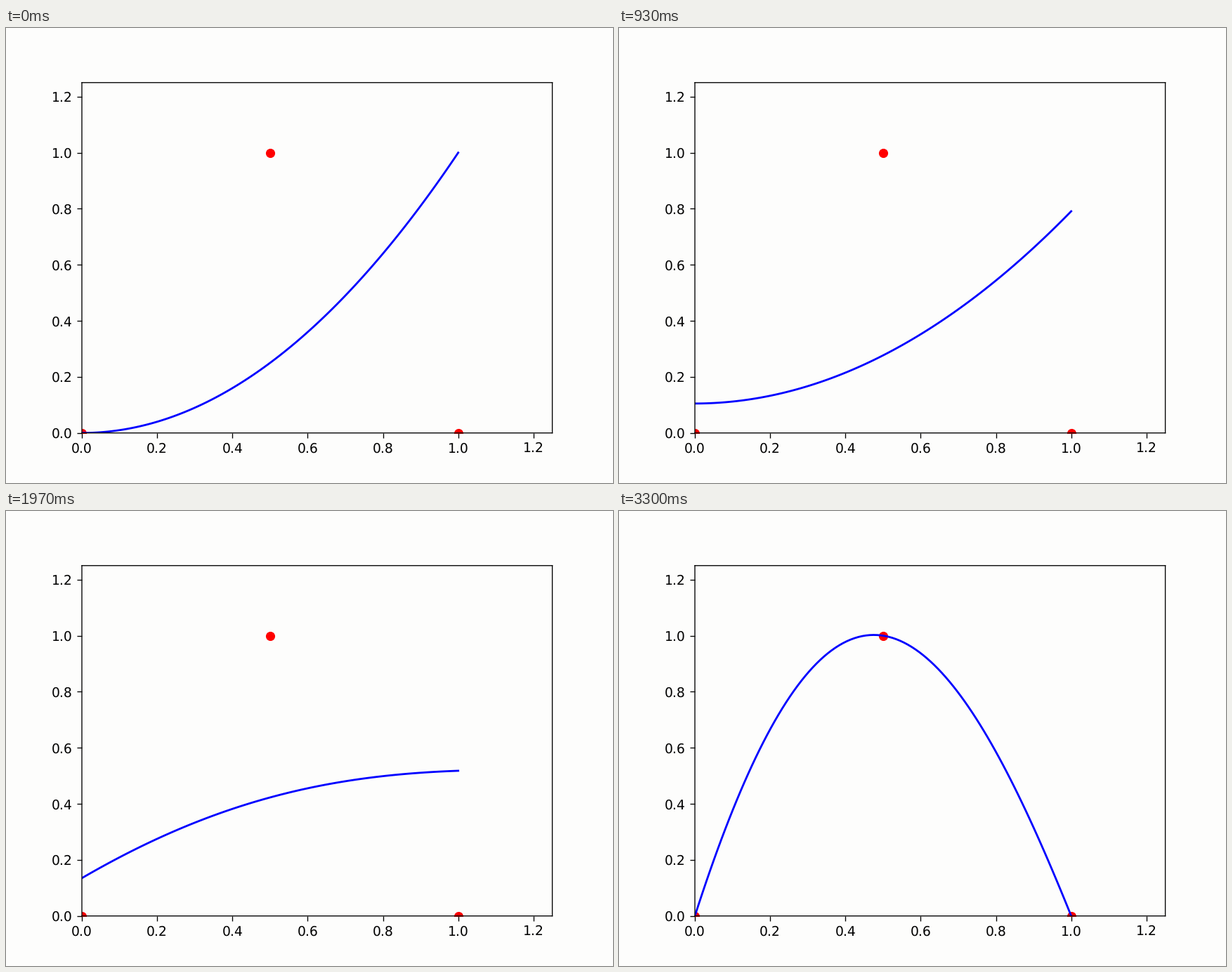
A matplotlib script for the animation above (3.33 s loop, 864 px wide and 648 px high).

```python
import numpy as np
import matplotlib.pyplot as plt
from matplotlib.animation import FuncAnimation

FRAMES, INTERVAL = 111, 30
PAPER = "#fdfdfc"

# Key points of the fit: curve height at both ends, and progress from dip to arch.
KEY_TIMES = [0, 360, 930, 1320, 1950, 2760, 3300]
LEFT = [0, 0.024, 0.105, 0.150, 0.135, 0.012, 0]
RIGHT = [1, 0.869, 0.791, 0.700, 0.518, 0.170, 0]
ARCH = [0, 0.021, 0.063, 0.092, 0.277, 0.804, 1]

plt.rcParams.update({
    "path.snap": False,
    "text.hinting": "none",
    "axes.linewidth": 0.72,
    "xtick.major.width": 0.72,
    "ytick.major.width": 0.72,
})


def height(x, time):
    """Straight line between the ends plus a bulge that leans left as it grows."""
    left, right, arch = (np.interp(time, KEY_TIMES, track)
                         for track in (LEFT, RIGHT, ARCH))
    side = 1 - 2 * x
    lean = arch**2 * (0.42 * side - 0.25 * side**2)
    return left + (right - left) * x + x * (1 - x) * (5 * arch - 1 + lean)


fig, ax = plt.subplots(figsize=(6.4, 4.8), dpi=135, facecolor=PAPER)
ax.set_facecolor(PAPER)
ax.set(xlim=(0, 1.25), ylim=(0, 1.25))
ax.plot([0, 0.5, 1], [0, 1, 0], "ro")
x = np.linspace(0, 1, 100)
curve, = ax.plot(x, height(x, 0), "b-")


def update(frame):
    curve.set_ydata(height(x, frame * INTERVAL))
    return curve,


anim = FuncAnimation(fig, update, frames=FRAMES, interval=INTERVAL,
                     repeat=True, repeat_delay=0)
plt.show()
```
